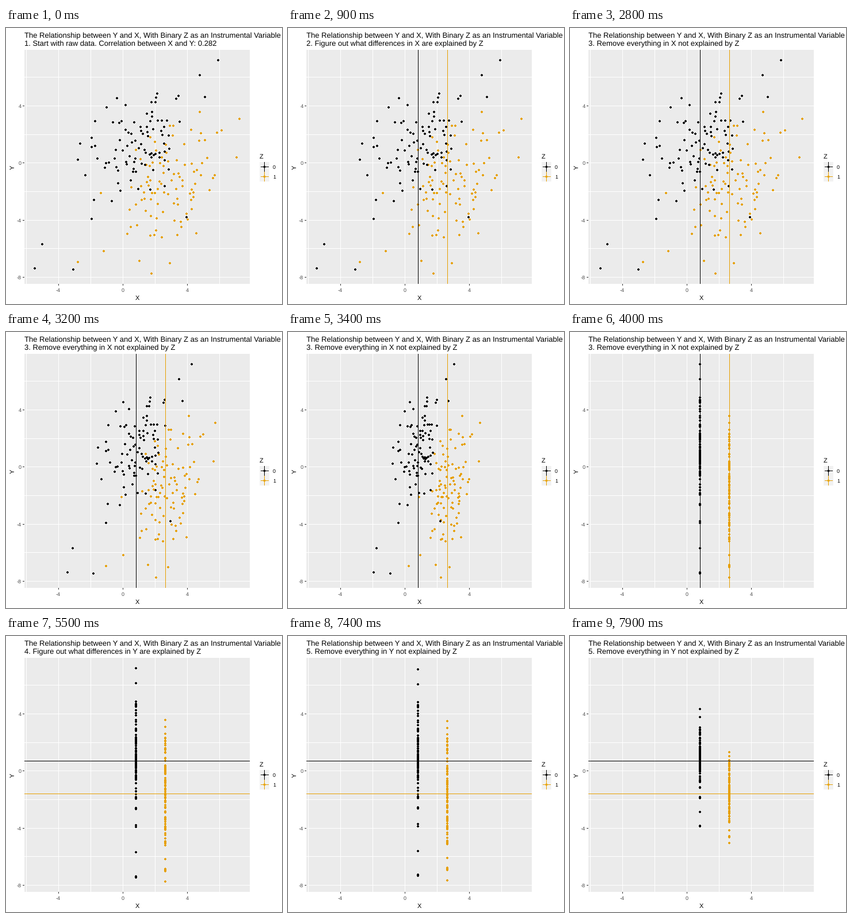
Animation of 480x480 px, one loop 8000 ms. Source, as a matplotlib script:

```python
import numpy as np
import matplotlib.pyplot as plt
from matplotlib.animation import FuncAnimation
from matplotlib.patches import Rectangle
from matplotlib.path import Path

plt.rcParams["font.family"] = "Liberation Sans"
plt.rcParams["text.hinting"] = "none"

SIZE, DPI = 480, 72
LEFT, TOP, RIGHT, BOTTOM = 32, 38, 424, 445
BLACK, ORANGE = COLORS = ("#000000", "#E69F00")
MEAN_X = (226, 277)
MEAN_Y = (217, 274)
STEPS = 13          # length of each collapse, in frames
X_START, Y_START = 27, 73

TITLES = [
    (0, "1. Start with raw data. Correlation between X and Y: 0.282"),
    (5, "2. Figure out what differences in X are explained by Z"),
    (28, "3. Remove everything in X not explained by Z"),
    (51, "4. Figure out what differences in Y are explained by Z"),
    (74, "5. Remove everything in Y not explained by Z"),
]

# A few extremes set the reach of each cloud.
ENDS_0 = [(50, 418), (63, 376), (117, 420), (314, 329), (337, 82), (369, 56)]
ENDS_1 = [(125, 407), (253, 427), (285, 409), (337, 146), (401, 225),
          (406, 158)]

rng = np.random.default_rng(12)


def cloud(ends, count, center, spread, low, high):
    """Random points along a rising trend, kept apart and within bounds."""
    pts = list(ends)
    while len(pts) < count:
        dx, dy = rng.normal(0, spread)
        p = np.add(center, (dx, dy - 0.5 * dx))
        inside = np.all(p > low) and np.all(p < high)
        if inside and min(np.hypot(*(p - q)) for q in pts) > 4:
            pts.append(p)
    return np.array(pts, float)


clouds = [
    cloud(ENDS_0, 98, (226, 206), (46, 42), (98, 104), (357, 346)),
    cloud(ENDS_1, 100, (281, 266), (52, 50), (163, 168), (391, 406)),
]
raw = np.vstack(clouds)
group = np.repeat([0, 1], [len(c) for c in clouds])
order = rng.permutation(len(raw))
raw, group = raw[order], group[order]
goal = np.column_stack([np.take(MEAN_X, group), np.take(MEAN_Y, group)])

# Dot: a 4 px square without its corner pixels
rim = np.array([c * 1j ** k for k in range(4)
                for c in (2 + 1j, 1 + 1j, 1 + 2j)])
DOT = Path(np.column_stack([rim.real, rim.imag]))

fig = plt.figure(figsize=(SIZE / DPI, SIZE / DPI), dpi=DPI, facecolor="white")
ax = fig.add_axes([0, 0, 1, 1])
ax.set_xlim(0, SIZE)
ax.set_ylim(SIZE, 0)
ax.axis("off")


def bar(x, y, w, h, color, z=1):
    return ax.add_patch(Rectangle((x, y), w, h, fc=color, ec="none", lw=0,
                                  antialiased=False, zorder=z))


def label(x, y, s, size, color=BLACK, ha="left", va="baseline", **kw):
    return ax.text(x, y, s, fontsize=size, color=color, ha=ha, va=va, **kw)


def dots(xy, colors, z):
    return ax.scatter(*np.transpose(xy), s=16, c=colors, marker=DOT,
                      linewidths=0, snap=False, zorder=z)


# Panel, grid and axes
bar(LEFT, TOP, RIGHT - LEFT, BOTTOM - TOP, "#EBEBEB", 0)
for v in range(-6, 7, 2):
    x = 203 + 28 * v
    bar(x, TOP, 1, BOTTOM - TOP, "white")
    if v % 4 == 0:
        bar(x, BOTTOM, 1, 3, "#333333")
        label(x, 459, str(v), 9, "#4D4D4D", ha="center")
for v in range(-8, 7, 2):
    y = round(234.3 - 24.85 * v)
    bar(LEFT, y, RIGHT - LEFT, 1, "white")
    if v % 4 == 0:
        bar(LEFT - 3, y, 3, 1, "#333333")
        label(27, y + 4, str(v), 9, "#4D4D4D", ha="right")
label(228, 473, "X", 11, ha="center")
label(12, 242, "Y", 11, ha="center", va="center", rotation=90)

# Legend
label(441, 227, "Z", 11)
for i, color in enumerate(COLORS):
    y = 233 + 17 * i
    bar(441, y, 17, 17, "#F2F2F2")
    bar(449, y, 1, 17, color, 2)
    bar(443, y + 8, 14, 1, color, 3)
    dots([(449, y + 8)], [color], 4)
    label(464, y + 12, str(i), 9)

label(32, 17, "The Relationship between Y and X, With Binary Z as an "
      "Instrumental Variable", 13)
step_title = label(32, 31, "", 13)

points = dots(raw, [COLORS[g] for g in group], 5)
v_lines = [bar(x, TOP, 1, BOTTOM - TOP, c, 6) for x, c in zip(MEAN_X, COLORS)]
h_lines = [bar(LEFT, y, RIGHT - LEFT, 1, c, 6) for y, c in zip(MEAN_Y, COLORS)]


def ease(frame, start):
    t = np.clip((frame - start) / STEPS, 0, 1)
    return (1 - np.cos(np.pi * t)) / 2


def update(frame):
    step_title.set_text([s for start, s in TITLES if start <= frame][-1])
    mix = np.array([ease(frame, X_START), ease(frame, Y_START)])
    points.set_offsets(np.round(raw + (goal - raw) * mix))
    for line in v_lines:
        line.set_visible(9 <= frame < 51)
    for line in h_lines:
        line.set_visible(frame >= 55)
    return [step_title, points, *v_lines, *h_lines]


anim = FuncAnimation(fig, update, frames=80, interval=100, repeat=True,
                     repeat_delay=0, blit=False)
plt.show()
```
